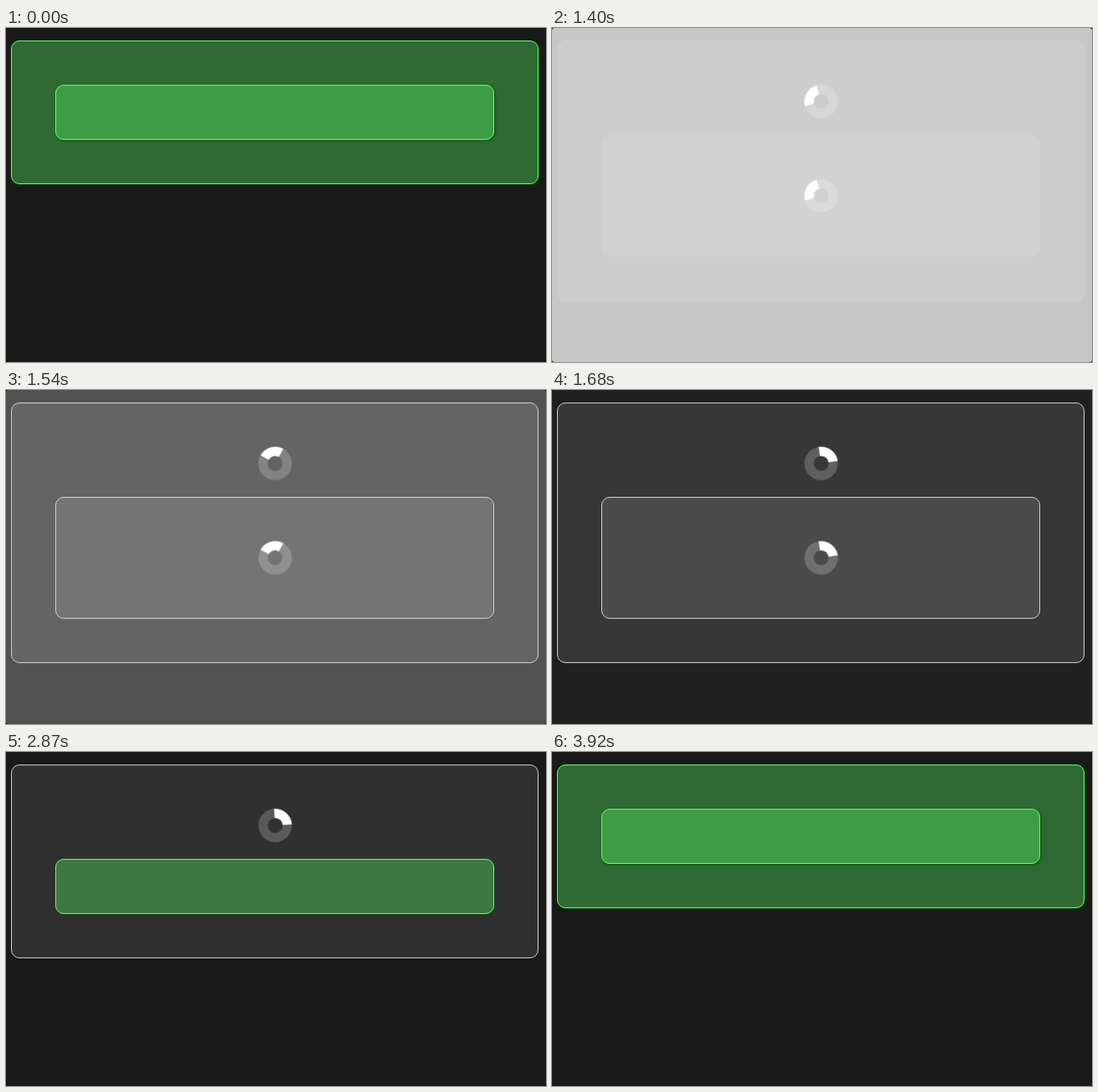
An HTML page that plays this animation: 646x400 px, repeating every 4480 ms.

```html
<!DOCTYPE html>
<html lang="en">
<head>
<meta charset="utf-8">
<title>Nested loading panels</title>
<style>
  * { box-sizing: border-box; }
  html, body { margin: 0; width: 100%; height: 100%; overflow: hidden; background: #111; }
  #page {
    position: relative;
    width: 646px;
    height: 400px;
    padding: 15px 9px 0 6px;
    border-radius: 3px;
    overflow: hidden;
    background: #191919;
  }
  .panel {
    padding: 52px;
    border: 1px solid #d0d0d0;
    border-radius: 10px;
    background: rgba(255, 255, 255, .1);
  }
  #inner.loaded { height: 66px; padding: 0; }
  .spinner {
    width: 40px;
    height: 40px;
    margin: 0 auto;
    border: 11px solid rgba(255, 255, 255, .2);
    border-left-color: #fff;
    border-radius: 50%;
  }
  #outer > .spinner { margin-bottom: 20px; }
  .loaded > .spinner { display: none; }
</style>
</head>
<body>
<div id="page">
  <div id="outer" class="panel">
    <div class="spinner"></div>
    <div id="inner" class="panel"><div class="spinner"></div></div>
  </div>
</div>
<script>
const LOOP = 4480, STEP = 70, RELOAD = 19, SETTLED = 37;
const FADE = 500, SPIN = 1100, INNER_AT = 1110, OUTER_AT = 2110;
const DONE = 5000;

// [step since reload, page clock in ms]
const clockKeys = [[0, 30], [2, 147], [5, 386], [16, 1100], [30, 2036], [37, 2503]];

const page = document.getElementById('page');
const outer = document.getElementById('outer');
const inner = document.getElementById('inner');
const anims = [];

function add(el, frames, options) {
  const anim = el.animate(frames, { fill: 'both', ...options });
  anim.pause();
  anims.push(anim);
}

const fade = (el, frames, delay) => add(el, frames, { duration: FADE, delay, easing: 'ease' });

const turnGreen = (el, delay) => fade(el, [
  { backgroundColor: 'rgba(255,255,255,.1)', borderColor: '#d0d0d0', boxShadow: '1px 1px 3px rgba(0,85,0,0)' },
  { backgroundColor: 'rgba(90,255,100,.35)', borderColor: '#66ff75', boxShadow: '1px 1px 3px rgba(0,85,0,1)' }
], delay);

fade(page, [{ backgroundColor: '#fff' }, { backgroundColor: '#191919' }], 0);
turnGreen(inner, INNER_AT);
turnGreen(outer, OUTER_AT);
for (const el of document.querySelectorAll('.spinner')) {
  add(el, [{ transform: 'rotate(0deg)' }, { transform: 'rotate(360deg)' }],
    { duration: SPIN, iterations: Infinity });
}

function clockAt(step) {
  if (step < 0 || step >= SETTLED) return DONE;
  const i = clockKeys.findIndex(([s]) => s > step);
  const [s0, c0] = clockKeys[i - 1], [s1, c1] = clockKeys[i];
  return c0 + (c1 - c0) * (step - s0) / (s1 - s0);
}

function render(ms) {
  const clock = clockAt(Math.floor(ms % LOOP / STEP) - RELOAD);
  inner.classList.toggle('loaded', clock >= INNER_AT);
  outer.classList.toggle('loaded', clock >= OUTER_AT);
  for (const anim of anims) anim.currentTime = clock;
}

const start = performance.now();
function tick() {
  render(performance.now() - start);
  requestAnimationFrame(tick);
}
tick();
</script>
</body>
</html>
```
